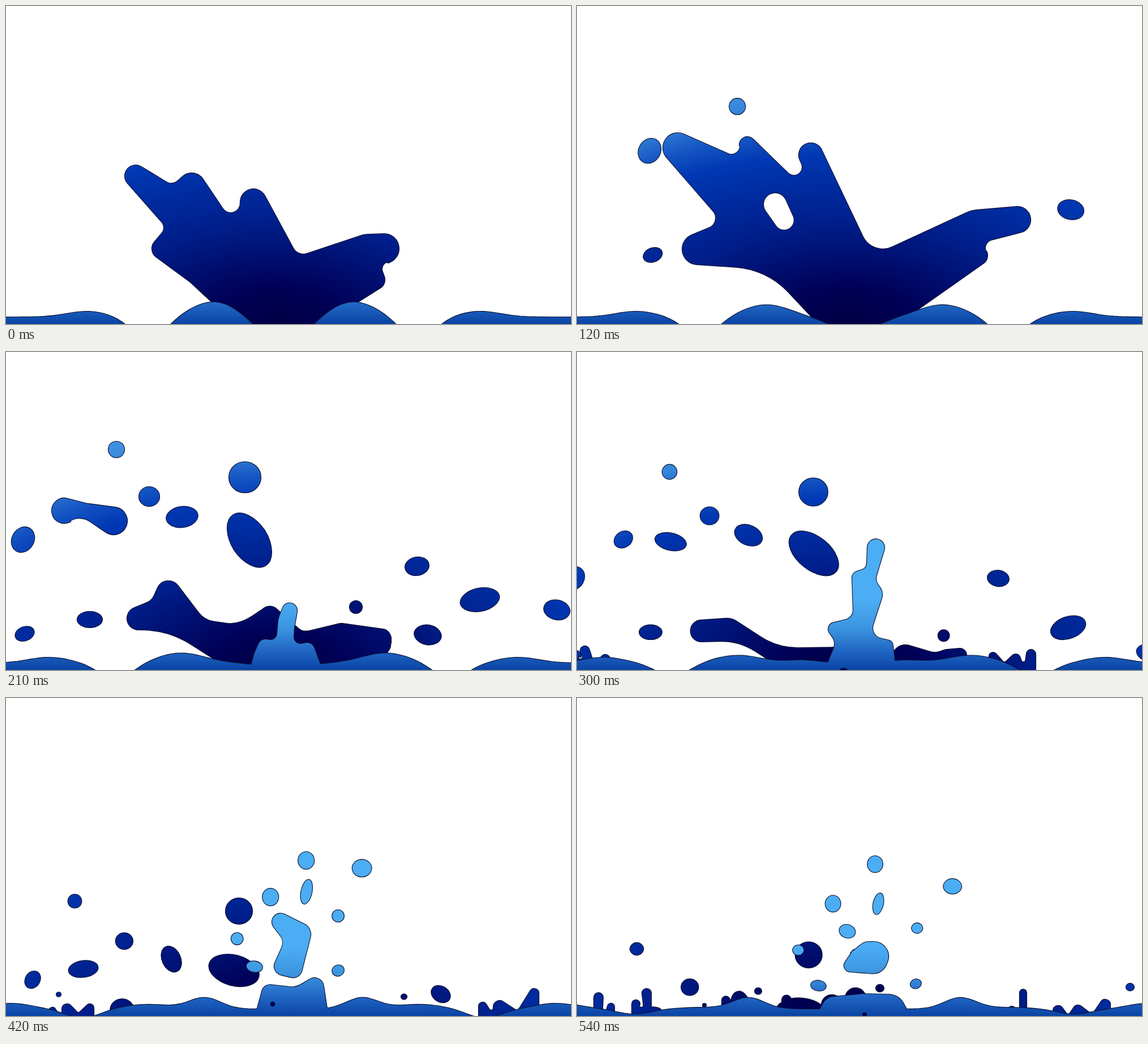
Write an HTML page that moves like this. It is 998 by 561 pixels and loops after 570 ms.

```html
<!DOCTYPE html>
<html lang="en">
<head>
<meta charset="utf-8">
<title>Splash</title>
<style>
html, body { margin: 0; width: 100%; height: 100%; overflow: hidden; background: #fff; }
svg { display: block; width: 100vw; height: 100vh; }
.line { fill: none; stroke: #0a1030; stroke-width: 2.2; stroke-linejoin: round; }
</style>
</head>
<body>
<svg viewBox="0 0 998 561">
  <defs>
    <radialGradient id="deep" gradientUnits="userSpaceOnUse" cx="0" cy="0" r="440" gradientTransform="translate(480 560) scale(1.9 1)">
      <stop offset="0" stop-color="#000045"/>
      <stop offset=".14" stop-color="#000056"/>
      <stop offset=".27" stop-color="#000f70"/>
      <stop offset=".41" stop-color="#001f8c"/>
      <stop offset=".56" stop-color="#002ca0"/>
      <stop offset=".68" stop-color="#0038b4"/>
      <stop offset=".77" stop-color="#1454c2"/>
      <stop offset=".88" stop-color="#3584da"/>
      <stop offset="1" stop-color="#4596e6"/>
    </radialGradient>
    <linearGradient id="light" gradientUnits="userSpaceOnUse" x1="0" y1="440" x2="0" y2="561">
      <stop offset="0" stop-color="#4badf3"/>
      <stop offset=".41" stop-color="#3a92de"/>
      <stop offset=".7" stop-color="#2268c6"/>
      <stop offset="1" stop-color="#0a44a4"/>
    </linearGradient>
  </defs>
  <path id="backLine" class="line"/><path id="back" fill="url(#deep)"/>
  <path id="frontLine" class="line"/><path id="front" fill="url(#light)"/>
  <path id="spots" fill="#00004a"/>
</svg>
<script>
const STEP = 30, STEPS = 19;
const layers = { back: [], front: [], spots: [] };

const clamp = (v, lo = 0, hi = 1) => Math.min(hi, Math.max(lo, v));
const mix = (a, b, u) => a + (b - a) * u;
const lower = (nodes, dy) => nodes.map(([x, y, r]) => [x, y + dy, r]);
const fix = v => v.toFixed(1);

// Belt around circles [x, y, r]: positive r is a rounded tip, negative r a hollow
function belt(nodes) {
  const n = nodes.length, full = Math.PI * 2;
  const normal = nodes.map(([x, y, r], i) => {
    const [qx, qy, qr] = nodes[(i + 1) % n];
    const k = (r - qr) / Math.hypot(qx - x, qy - y);
    return Math.atan2(qy - y, qx - x) - Math.acos(clamp(k, -1, 1));
  });
  let d = '';
  nodes.forEach(([x, y, r], i) => {
    const a = normal[(i + n - 1) % n], b = normal[i];
    const point = w => fix(x + r * Math.cos(w)) + ' ' + fix(y + r * Math.sin(w));
    const turn = (((r > 0 ? b - a : a - b) % full) + full) % full;
    const arc = turn < 5.2 ? `A${Math.abs(r)} ${Math.abs(r)} 0 ${+(turn > Math.PI)} ${+(r > 0)} ` : 'L';
    d += (i ? 'L' : 'M') + point(a) + arc + point(b);
  });
  return d + 'Z';
}

function oval(x, y, rx, ry, turn = 0) {
  const r = turn * Math.PI / 180, dx = rx * Math.cos(r), dy = rx * Math.sin(r);
  const half = `A${fix(rx)} ${fix(ry)} ${fix(turn)} 0 1 `;
  return `M${fix(x - dx)} ${fix(y - dy)}${half}${fix(x + dx)} ${fix(y + dy)}${half}${fix(x - dx)} ${fix(y - dy)}Z`;
}

// Belt that changes between poses [time, nodes]
function morph(layer, ...poses) {
  layers[layer].push(t => {
    const i = poses.findIndex((p, k) => k && t >= poses[k - 1][0] && t <= p[0]);
    if (i < 0) return '';
    const [t0, a] = poses[i - 1], [t1, b] = poses[i], u = (t - t0) / (t1 - t0);
    return belt(a.map((node, k) => node.map((v, c) => mix(v, b[k][c], u))));
  });
}

// Flight slows down near the end of the loop
const flight = t => t < 420 ? t : 420 + (t - 420) * .38;

// Thrown drop: place at time t0, speed in px per 100 ms, radii, turn and spin.
// The burst before t0 is faster.
function thrower(layer, t0, g, first) {
  return (x, y, vx, vy, rx, ry, turn = 0, { spin = 0, from = first } = {}) =>
    layers[layer].push(t => {
      if (t < from) return '';
      const dt = flight(t) - t0, s = (dt < 0 ? 2.8 : 1) * dt / 100;
      const size = 1 - .16 * clamp(dt / 150);
      return oval(x + vx * s, y + vy * s + g * dt * dt, rx * size, ry * size, turn + spin * Math.max(s, 0));
    });
}
const dark = thrower('back', 210, .00375, 150);
const bright = thrower('front', 360, .006, 330);

// Spikes that leave the water, peak at time t and sink
function splash(t, ...tips) {
  const nodes = tips.flatMap((tip, i) => {
    const next = tips[i + 1];
    return next ? [tip, [(tip[0] + next[0]) / 2, Math.max(tip[1], next[1]) + 2, -4]] : [tip];
  });
  const first = tips[0], last = tips[tips.length - 1];
  nodes.unshift([first[0] - first[2], 590, 0]);
  nodes.push([last[0] + last[2], 590, 0]);
  morph('back', [t - 60, lower(nodes, 45)], [t, nodes], [t + 60, lower(nodes, 45)]);
}

function speck(peak, x, y, r) {
  layers.back.push(t => Math.abs(t - peak) > 45 ? '' : oval(x, y + .012 * (t - peak) ** 2, r, r * .92));
}

// Dark crown with its opening
morph('back',
  [0, [[415, 570, 0], [287, 533, -60], [276, 428, 18], [264, 391, -15], [229, 300, 19], [292, 296, -17], [328, 319, 24],
    [397, 348, -17], [437, 346, 23], [525, 418, -20], [640, 440, 37], [668, 428, 26], [677, 464, -13], [652, 483, 17], [545, 570, 0]]],
  [120, [[430, 565, 0], [270, 602, -142], [213, 429, 27], [226, 374, -19], [178, 250, 26], [273, 247, -15], [301, 245, 14],
    [383, 284, -15], [413, 263, 21], [540, 390, -39], [710, 412, 52], [778, 377, 23], [736, 427, -15], [708, 440, 17], [560, 565, 0]]],
  [210, [[420, 575, 0], [240, 650, -160], [234, 470, 20], [240, 420, -24], [287, 425, 21], [372, 436, -40], [395, 500, 20],
    [430, 445, -30], [466, 467, 18], [530, 472, -21], [592, 496, 17], [664, 504, 15], [700, 511, -20], [664, 517, 15], [640, 575, 0]]]);
morph('back',
  [75, [[354, 370, -2], [356, 374, -2]]],
  [120, [[350, 350, -21], [366, 378, -18]]]);

// What is left of it on both sides
const leftRest = [[380, 570, 0], [255, 620, -110], [220, 492, 19], [235, 440, -32], [265, 500, 30], [390, 400, -122], [466, 535, 14], [480, 575, 0]];
morph('back',
  [210, [[420, 575, 0], [240, 650, -160], [234, 470, 20], [240, 420, -24], [287, 425, 21], [390, 400, -80], [466, 467, 18], [480, 575, 0]]],
  [300, leftRest], [360, lower(leftRest, 65)]);
const rightRest = [[550, 580, 0], [580, 540, 23], [632, 500, -30], [655, 550, 25], [676, 535, 12], [676, 580, 0]];
morph('back',
  [210, [[500, 580, 0], [515, 505, 13], [545, 472, -21], [592, 496, 17], [664, 506, 16], [655, 580, 0]]],
  [300, rightRest], [360, lower(rightRest, 45)]);

splash(300, [-2, 536, 9], [14, 527, 8], [50, 542, 8]);
splash(300, [735, 537, 7], [775, 541, 8], [802, 533, 8]);
splash(360, [663, 540, 6], [706, 546, 16]);
splash(375, [235, 560, 36], [310, 562, 18]);
splash(420, [82, 552, 6], [108, 549, 9], [148, 547, 7]);
splash(420, [205, 552, 21]);
splash(420, [842, 544, 7], [872, 545, 11], [933, 521, 8]);
splash(540, [38, 528, 8], [60, 545, 6]);
splash(540, [104, 540, 7], [123, 521, 8]);
splash(540, [263, 533, 7], [282, 547, 6]);
splash(540, [370, 533, 8], [400, 560, 14]);
splash(540, [450, 542, 18], [492, 530, 18]);
splash(540, [768, 550, 6], [788, 520, 6]);
splash(540, [850, 552, 9], [885, 551, 9], [933, 541, 9]);

speck(360, 2, 511, 6);
speck(360, 71, 520, 6);
speck(360, 772, 523, 11);
speck(360, 832, 528, 6);
speck(420, 93, 523, 4);
speck(420, 703, 527, 5);
speck(540, 225, 542, 3);
speck(540, 320, 517, 6);
speck(540, 535, 512, 7);
speck(540, 977, 510, 7);

// Dark drops
dark(195, 172, -35, 10, 14, 14, 0, { from: 90 });
dark(30, 331, -39, 42, 19, 23, 30, { from: 90 });
dark(33, 497, -40, 35, 17, 12, -20, { from: 90 });
dark(973, 455, 40, 50, 23, 17, 12, { from: 90 });
dark(148, 472, -20, -9, 22, 14);
dark(837, 437, 34, 21, 35, 21, -12, { spin: -8 });
dark(726, 378, 20, -10, 21, 16, -10, { spin: 20 });
dark(745, 499, 20, 45, 24, 18, 10);
dark(618, 450, 33, 22, 11, 11);
dark(422, 221, -5, -5, 28, 27);
dark(430, 332, -13, -8, 32, 56, -33, { spin: -20 });
dark(311, 291, -9, 2, 28, 19, -8, { spin: 35 });
dark(253, 255, -21, 4, 18, 17);
// A dumbbell that splits in two
const bone = [[103, 280, 22], [148, 238, -30], [190, 298, 24], [130, 326, -33]];
morph('back', [180, bone.map(([x, y, r]) => [x + 20, y - 8, r])], [210, bone], [240, bone.map(([x, y, r]) => [x - 9, y + 15, r])]);
dark(108, 277, -29, 26, 19, 16, -15, { from: 255, spin: -20 });
dark(187, 298, -24, 7, 31, 17, 28, { from: 255, spin: -17 });

// Water surface: pairs of crests and troughs running outwards
const bump = (d, at, width) => Math.exp(-((d - at) ** 2) / (2 * width * width));
function level(x, t) {
  const d = Math.abs(x - 490);
  return 549
    + 50 * clamp(1 - t / 250) * bump(d, 0, 40)
    - 27 * (1 - t / 600) * bump(d, 122 + .28 * t, 42)
    + 40 * (1 - t / 700) * bump(d, 237 + .28 * t, 30)
    - 10 * bump(d, 347 + .32 * t, 36)
    - 20 * clamp((t - 280) / 80) * bump(d, 115 + .4 * (t - 360), 28);
}
layers.front.push(t => {
  let d = 'M-20 600';
  for (let x = -20; x <= 1020; x += 8) d += `L${x} ${fix(level(x, t))}`;
  return d + 'L1020 600Z';
});

// Light jet, then its stub and the torn-off body
const spout = [[425, 580, 0], [420, 525, -20], [458, 520, 13], [467, 496, -12], [492, 475, 11], [478, 462, -6],
  [501, 456, 13], [530, 472, -18], [500, 485, 9], [520, 503, -12], [532, 526, 13], [566, 580, 0]];
morph('front', [135, lower(spout, 125)], [210, spout],
  [300, [[430, 580, 0], [433, 515, -22], [456, 489, 12], [470, 455, -18], [497, 398, 11], [499, 372, -13],
    [528, 345, 15], [545, 400, -17], [517, 428, 22], [541, 487, -19], [547, 519, 11], [566, 580, 0]]],
  [360, [[425, 580, 0], [433, 515, -20], [450, 469, 12], [463, 440, -17], [484, 371, 14], [503, 343, -17],
    [535, 314, 16], [552, 383, -22], [535, 424, 17], [545, 468, -20], [537, 516, 16], [572, 580, 0]]]);
morph('front',
  [360, [[440, 580, 0], [466, 490, 14], [500, 430, -20], [530, 500, 16], [570, 580, 0]]],
  [420, [[435, 580, 0], [466, 520, 14], [505, 480, -30], [545, 510, 16], [572, 580, 0]]],
  [540, [[405, 590, 0], [455, 550, 23], [505, 470, -52], [550, 553, 30], [605, 590, 0]]]);
morph('front',
  [360, [[488, 374, 16], [525, 415, 22], [505, 455, 18], [490, 455, 18], [458, 415, -18]]],
  [420, [[485, 395, 15], [518, 417, 20], [507, 477, 16], [490, 473, 16], [468, 432, -21]]],
  [540, [[516, 452, 22], [524, 456, 26], [523, 461, 25], [483, 472, 11], [470, 432, -22]]]);

// Light drops
bright(583, 296, 76, -29, 18, 16);
bright(568, 394, 31, -52, 11, 11);
bright(571, 488, 26, -48, 11, 10, -20);
bright(431, 436, -38, -55, 11, 11);
bright(455, 468, -27, -26, 15, 10, 8);
bright(487, 374, -33, -74, 15, 16);
bright(535, 316, -8, -85, 15, 16);
bright(529, 352, 3, -53, 10, 24, 12, { from: 360 });
bright(488, 390, -10, -43, 16, 13, 18, { from: 450 });

// Dark bubbles rising in front
function bubble(x, from, r) {
  layers.spots.push(t => t < from || t > from + 120 ? '' : oval(x, 564 - .2 * (t - from), r - .03 * (t - from), r * .85 - .02 * (t - from)));
}
bubble(471, 300, 8);
bubble(508, 510, 5);

const el = id => document.getElementById(id);
function draw(t) {
  for (const id in layers) {
    const d = layers[id].map(part => part(t)).join('');
    el(id).setAttribute('d', d);
    el(id + 'Line')?.setAttribute('d', d);
  }
}
let start;
function tick(now) {
  start ??= now;
  draw(Math.floor((now - start) / STEP) % STEPS * STEP);
  requestAnimationFrame(tick);
}
draw(0);
requestAnimationFrame(tick);
</script>
</body>
</html>
```
